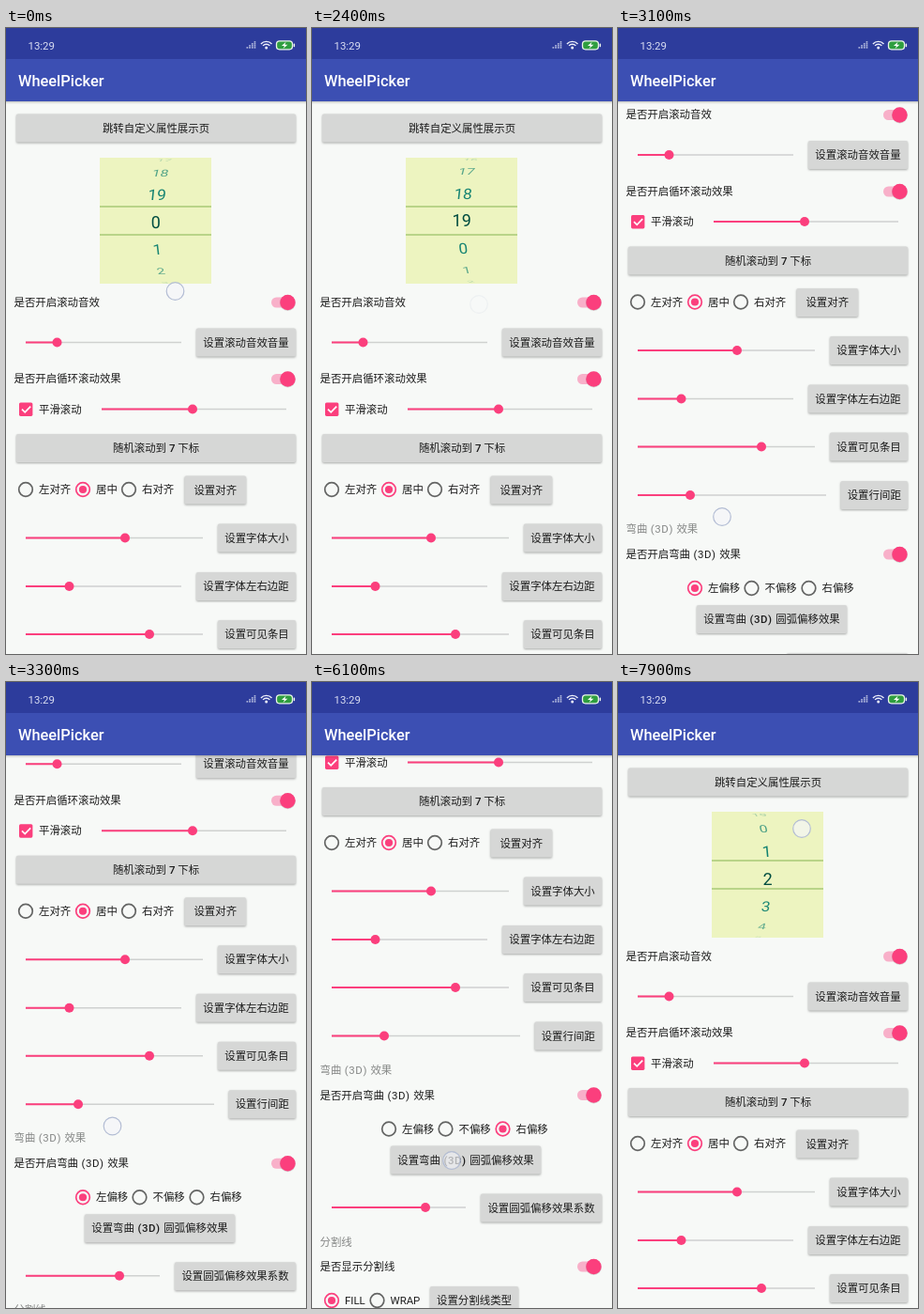
Write an HTML page that moves like this. It is 320 px wide and 666 px high and loops after 8 s.

```html
<!DOCTYPE html>
<html lang="zh">
<head>
<meta charset="utf-8">
<title>WheelPicker</title>
<style>
  html, body { margin: 0; width: 100%; height: 100%; overflow: hidden; background: #f7f9f7; }
  svg { display: block; width: 100vw; height: 100vh; }
  text { font: 400 11.43px Roboto, "Noto Sans CJK SC", "Noto Sans CJK", sans-serif; fill: #1c1c1c; white-space: pre; }
  .mid { text-anchor: middle; }
  .mid tspan { font-weight: 500; }
  .grey { fill: #858786; }
  .btn { fill: #d6d7d6; filter: drop-shadow(0 1px .8px rgba(0, 0, 0, .32)); }
  .wheel text { font-size: 18px; text-anchor: middle; }
  .normal text { fill: #00796b; }
  .chosen text { fill: #004d40; }
</style>
</head>
<body>
<script>
const LOOP = 8000, STEP = 100;
const PINK = '#fb3f7d', TRACK = '#cfd1d0';

// ---- drawing helpers ----
const rect = (x, y, w, h, fill, r = 0, more = '') =>
  `<rect x="${x}" y="${y}" width="${w}" height="${h}" rx="${r}" fill="${fill}" ${more}/>`;
const circle = (x, y, r, more) => `<circle cx="${x}" cy="${y}" r="${r}" ${more}/>`;
const line = (x1, x2, y, color, w) =>
  `<path d="M${x1} ${y}H${x2}" stroke="${color}" stroke-width="${w}"/>`;

// Latin runs get their own span; bracketed runs are set a little wider.
const runs = s => s.replace(/ [^ ]+ /g, m =>
  `<tspan${m.includes('(') ? ' letter-spacing=".6"' : ''}>${m}</tspan>`);
const label = (x, y, s, cls = '') =>
  `<text x="${x}" y="${y + 4.2}" class="${cls}">${runs(s)}</text>`;

const button = (x1, x2, y, s) =>
  rect(x1, y - 15, x2 - x1, 30, '#d6d7d6', 1.6, 'class="btn"') + label((x1 + x2) / 2, y, s, 'mid');
const seek = (x1, x2, thumb, y) =>
  line(x1, x2, y, TRACK, 1.7) + line(x1, thumb, y, PINK, 2) + circle(thumb, y, 5, `fill="${PINK}"`);
const toggle = y =>
  rect(283, y - 5.5, 23, 11, '#f8b0c9', 5.5) +
  circle(300.5, y + .5, 8.4, 'fill="#000" opacity=".14"') + circle(300.5, y, 8.2, `fill="${PINK}"`);
const radio = (x, y, s, on, id = '') => {
  const c = on ? PINK : '#646564';
  return `<g ${id && `id="${id}"`}>` + circle(x, y, 7.3, `fill="none" stroke="${c}" stroke-width="1.7"`) +
    circle(x, y, 4.1, `fill="${PINK}" opacity="${on ? 1 : 0}"`) + '</g>' + label(x + 14, y, s);
};

// ---- page content, in scroll coordinates ----
const wheelBox = rect(100, 138, 119, 134, '#edf4c0') +
  '<g class="wheel" clip-path="url(#box)">' +
  '<g class="normal" clip-path="url(#outer)"></g><g class="chosen" clip-path="url(#band)"></g></g>' +
  line(100, 219, 190, '#86b552', 1.1) + line(100, 219, 220, '#86b552', 1.1);

const page = [
  button(11, 309, 106.5, '跳转自定义属性展示页'),
  wheelBox,
  label(8.5, 291.5, '是否开启滚动音效'), toggle(292),
  seek(21, 187, 54.5, 334.5), button(203, 309, 334.5, '设置滚动音效音量'),
  label(8.5, 373, '是否开启循环滚动效果'), toggle(373.5),
  rect(14, 398.5, 14.4, 14.4, PINK, 1.6),
  '<path d="M17 405.6l3.2 3.2 6-6.2" fill="none" stroke="#fff" stroke-width="1.7"/>',
  label(35, 405.5, '平滑滚动'), seek(102, 299, 199, 405.5),
  button(11, 309, 447, '随机滚动到 7 下标'),
  radio(21, 491, '左对齐'), radio(82, 491, '居中', true), radio(131, 491, '右对齐'),
  button(190.5, 256, 491.5, '设置对齐'),
  seek(21, 210, 127, 542.5), button(226, 309, 542.5, '设置字体大小'),
  seek(21, 187, 67.5, 594), button(203, 309, 594, '设置字体左右边距'),
  seek(21, 210, 153, 645), button(226, 309, 645, '设置可见条目'),
  seek(21, 222, 77, 696.5), button(237.5, 309, 696.5, '设置行间距'),
  label(8.5, 732.5, '弯曲 (3D) 效果', 'grey'),
  label(8.5, 759.5, '是否开启弯曲 (3D) 效果'), toggle(759.5),
  radio(82, 795.5, '左偏移', true, 'left'), radio(142.5, 795.5, '不偏移'),
  radio(203.5, 795.5, '右偏移', false, 'right'),
  button(84, 244, 828.5, '设置弯曲 (3D) 圆弧偏移效果'),
  circle(149, 829, 10, 'id="ripple" clip-path="url(#key)"'),
  seek(21, 164, 121, 879), button(180, 309, 879.5, '设置圆弧偏移效果系数'),
  label(8.5, 915.5, '分割线', 'grey'),
  label(8.5, 942, '是否显示分割线'), toggle(942),
  radio(21, 978, 'FILL', true), radio(69.5, 978, 'WRAP'),
  button(126, 220, 978, '设置分割线类型')
].join('');

// ---- status bar and title ----
const signal = [0, 1, 2, 3].map(i => [...Array(i < 1 ? 1 : i + 1)].map((_, k) =>
  rect(256.5 + i * 2.7, 20.3 - k * 2, 1.7, 1.2, '#dfe3f4')).join('')).join('');
const arc = r => `<path d="M${277.7 - r * .76} ${22 - r * .65}A${r} ${r} 0 0 1 ${277.7 + r * .76} ${22 - r * .65}"
  fill="none" stroke="#eef0fa" stroke-width="1.4"/>`;
const header =
  rect(-5, 60, 330, 18.5, '#000', 0, 'opacity=".35" filter="url(#soft)"') +
  rect(0, 0, 320, 33, '#2d3c9c') + rect(0, 33, 320, 45, '#3c4fb3') +
  '<text x="23.5" y="22.5" style="fill:#dadef2">13:29</text>' +
  '<text x="13" y="62" style="font-size:16.4px;font-weight:500;fill:#fff">WheelPicker</text>' +
  signal + arc(7.6) + arc(4.8) + circle(277.7, 21, 1.5, 'fill="#eef0fa"') +
  rect(288.5, 13.8, 17, 9, '#2f9e3f', 3.2, 'stroke="#e9f3ea" stroke-width="1.3"') +
  rect(306.6, 16.4, 1.5, 3.8, '#e9f3ea', .7) +
  '<path d="M298.6 14.8l-4.6 4.1h3l-1.4 3.1 4.8-4.2h-3z" fill="#fff"/>';

document.body.insertAdjacentHTML('afterbegin', `<svg viewBox="0 0 320 666">
  <defs>
    <clipPath id="box">${rect(100, 138, 119, 134, '#000')}</clipPath>
    <clipPath id="band">${rect(100, 190, 119, 30, '#000')}</clipPath>
    <clipPath id="outer">${rect(100, 138, 119, 52, '#000')}${rect(100, 220, 119, 52, '#000')}</clipPath>
    <clipPath id="key">${rect(84, 813.5, 160, 30, '#000', 1.6)}</clipPath>
    <filter id="soft" x="-10%" y="-50%" width="120%" height="200%"><feGaussianBlur stdDeviation="1.6"/></filter>
  </defs>
  ${rect(0, 0, 320, 666, '#f7f9f7')}
  <g id="page">${page}</g>${header}
  ${circle(0, 0, 9.3, 'id="finger" fill="#f3f5f8" fill-opacity=".7" stroke="#b3bdd4" stroke-width="1.2"')}
</svg>`);

const $ = s => document.querySelector(s);

// ---- motion tables: [time, value, ease out?] ----
const scrollKeys = [[2400, 0], [2700, 150], [3000, 199.5, 1], [3100, 199.5], [3500, 295], [3800, 320, 1],
  [6600, 320], [6800, 96], [7100, 0, 1]];
const wheelKeys = [[0, 2], [1800, 16], [2100, 30, 1], [7400, 30], [7900, -55]];
// [shown, moves, lifted, fade, x0, y0, x1, y1]
const touches = [
  [0, 0, 1800, 700, 180.5, 280, 178, 294],
  [2300, 2400, 2700, 150, 90, 518, 100, 368],
  [3000, 3100, 3500, 200, 111, 520, 116, 425],
  [4400, 4400, 4500, 200, 203, 475, 203, 475],
  [6100, 6100, 6200, 200, 149, 509, 149, 509],
  [6600, 6600, 6800, 200, 100, 337, 107.5, 561],
  [7400, 7400, 7900, 100, 187, 241, 196, 156]
];

const clamp = v => Math.max(0, Math.min(1, v));
const mix = (a, b, p) => a + (b - a) * p;
function track(keys, t) {
  const n = keys.findIndex(k => k[0] > t);
  if (n < 0) return keys[keys.length - 1][1];
  if (n === 0) return keys[0][1];
  const [t0, a] = keys[n - 1], [t1, b, out] = keys[n];
  const p = (t - t0) / (t1 - t0);
  return mix(a, b, out ? 1 - (1 - p) ** 2 : p);
}

// ---- wheel ----
const ITEM = 30, COUNT = 20, RADIUS = 66.85, EYE = 171, SHIFT = 41;
const slots = [...Array(9)].map(() => ['.normal', '.chosen'].map(sel => {
  const el = document.createElementNS('http://www.w3.org/2000/svg', 'text');
  el.setAttribute('y', 6.4);
  return $(sel).appendChild(el);
}));

function drawWheel(w, side) {
  const first = Math.round(-w / ITEM) - 4;
  const u = -SHIFT * side;
  slots.forEach((pair, k) => {
    const i = first + k, a = (i * ITEM + w) / RADIUS, cos = Math.cos(a);
    const shown = Math.abs(a) < Math.PI / 2;
    const s = EYE / (EYE + RADIUS * (1 - cos));
    const skew = -u * s * s / EYE * Math.sin(a);
    const m = [s, 0, skew, s * cos, 159.7 + u * (s - 1), 205 + RADIUS * Math.sin(a)];
    pair.forEach((el, chosen) => {
      el.textContent = shown ? ((i % COUNT) + COUNT) % COUNT : '';
      el.setAttribute('transform', `matrix(${m})`);
      el.setAttribute('opacity', chosen ? 1 : Math.max(0, cos));
    });
  });
}

function setRadio(id, on) {
  const [ring, dot] = $(id).children;
  ring.setAttribute('stroke', on ? PINK : '#646564');
  dot.setAttribute('opacity', on ? 1 : 0);
}

function drawFinger(t) {
  const f = touches.find(([shown, , lifted, fade]) => t >= shown && t < lifted + fade);
  const el = $('#finger');
  if (!f) return el.setAttribute('opacity', 0);
  const [, t0, t1, fade, x0, y0, x1, y1] = f;
  const p = t1 > t0 ? clamp((t - t0) / (t1 - t0)) : 1;
  el.setAttribute('cx', mix(x0, x1, p));
  el.setAttribute('cy', mix(y0, y1, p));
  el.setAttribute('opacity', 1 - clamp((t - t1) / fade));
}

function draw(t) {
  $('#page').setAttribute('transform', `translate(0 ${-track(scrollKeys, t)})`);
  drawWheel(track(wheelKeys, t), t < 6200 ? 1 : -1);
  setRadio('#left', t < 4600);
  setRadio('#right', t >= 4600);
  const p = (t - 6100) / 300, live = p >= 0 && p < 1;
  $('#ripple').setAttribute('r', live ? mix(10, 48, p) : 0);
  $('#ripple').setAttribute('opacity', live ? .08 * (1 - p) : 0);
  drawFinger(t);
}

const start = performance.now();
function tick() {
  const t = (performance.now() - start) % LOOP;
  draw(Math.floor(t / STEP) * STEP);
  requestAnimationFrame(tick);
}
tick();
</script>
</body>
</html>
```
